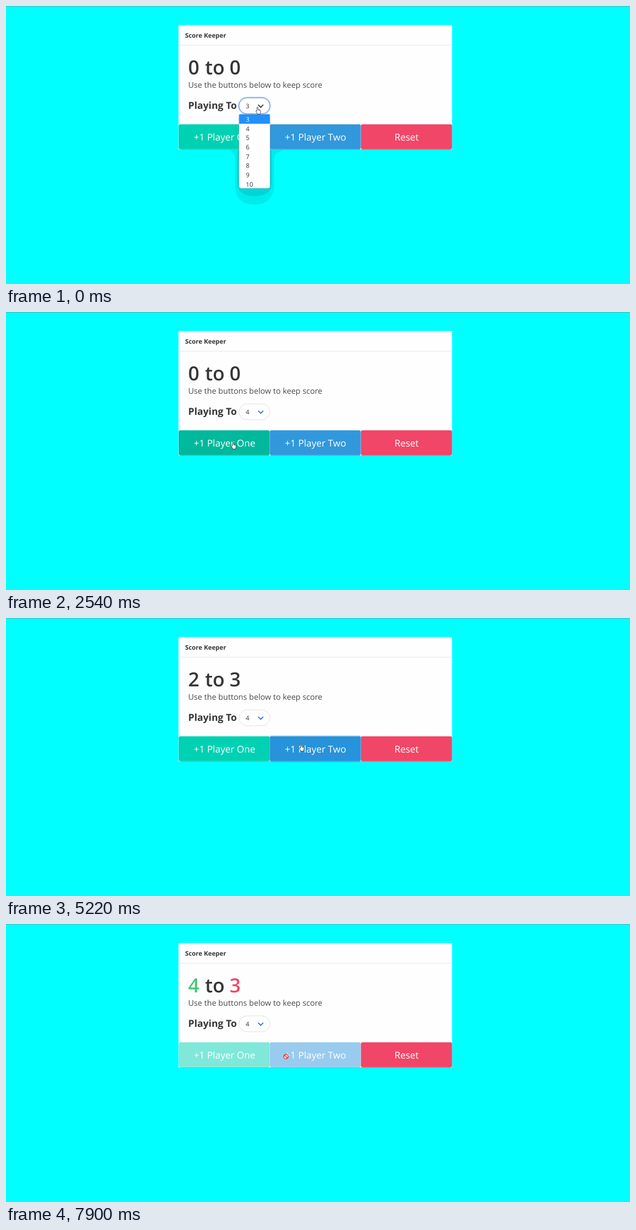
Animation, 1120 px wide and 500 px high, one loop 8 s. Source, as an HTML page:

```html
<!DOCTYPE html>
<html lang="en">
<head>
<meta charset="utf-8">
<title>Score Keeper</title>
<style>
html, body { margin: 0; width: 100%; height: 100%; overflow: hidden; background: #0ff; }
svg { display: block; }
text { font-family: "Open Sans", "Noto Sans", sans-serif; fill: #363636; text-rendering: geometricPrecision; }
.bold { font-weight: 700; }
.score text { font-size: 35px; font-weight: 600; }
.label text { font-size: 17px; fill: #fff; text-anchor: middle; }
.small { font-size: 11.3px; }
.ring { fill: none; stroke-width: 1.8; stroke-opacity: .35; }

/* Every change is a hard cut on one shared 8 s clock. */
.a { animation: 8s step-end infinite; }

.menu { animation-name: menu; }
@keyframes menu { 0% { visibility: visible } 17.625%, 100% { visibility: hidden } }
.picked { animation-name: picked; }
@keyframes picked { 0% { visibility: hidden } 17.625%, 100% { visibility: visible } }
.bar { animation-name: bar; }
@keyframes bar { 0% { transform: none } 6.375%, 100% { transform: translateY(16.7px) } }
.opt3 { animation-name: opt3; }
@keyframes opt3 { 0% { fill: #fff } 6.375%, 100% { fill: #363636 } }
.opt4 { animation-name: opt4; }
@keyframes opt4 { 0% { fill: #363636 } 6.375%, 100% { fill: #fff } }
.chevron { animation-name: chevron; }
@keyframes chevron { 0% { stroke: #363636 } 17.625%, 100% { stroke: #3273dc } }
.pill { animation-name: pill; }
@keyframes pill { 0% { stroke: #3f7be0 } 31.75%, 100% { stroke: #dbdbdb } }
.halo { animation-name: halo; }
@keyframes halo { 0% { visibility: visible } 31.75%, 100% { visibility: hidden } }

.left { animation-name: left; }
@keyframes left {
  0% { transform: none }
  33.375% { transform: translateY(-50px) }
  38.125% { transform: translateY(-100px) }
  78.375% { transform: translateY(-150px) }
  86.375%, 100% { transform: translateY(-200px) }
}
.right { animation-name: right; }
@keyframes right {
  0% { transform: none }
  47.75% { transform: translateY(-50px) }
  58.75% { transform: translateY(-100px) }
  65.25%, 100% { transform: translateY(-150px) }
}
.lost { animation-name: lost; }
@keyframes lost { 0% { fill: #363636 } 86.375%, 100% { fill: #f14668 } }

.one { animation-name: one; }
@keyframes one {
  0% { fill: #00d1b2 }
  17.625% { fill: #00c4a7 }
  31.75% { fill: #00b89c }
  33.375% { fill: #00c4a7 }
  36.5% { fill: #00b89c }
  38.125% { fill: #00c4a7 }
  41.25% { fill: #00d1b2 }
  68.75% { fill: #00c4a7 }
  75.125% { fill: #00b89c }
  78.375% { fill: #00c4a7 }
  81.625% { fill: #00b89c }
  86.375%, 100% { fill: #7fe8d8 }
}
.two { animation-name: two; }
@keyframes two {
  0% { fill: #3298dc }
  41.25% { fill: #2793da }
  46.125% { fill: #238cd1 }
  47.75% { fill: #2793da }
  57.125% { fill: #238cd1 }
  58.75% { fill: #2793da }
  68.75% { fill: #3298dc }
  86.375%, 100% { fill: #98cbed }
}
.ring1 { animation-name: ring1; }
@keyframes ring1 {
  0%, 36.5%, 46.125%, 81.625%, 100% { visibility: hidden }
  33.375%, 38.125%, 78.375% { visibility: visible }
}
.ring2 { animation-name: ring2; }
@keyframes ring2 {
  0%, 57.125%, 75.125%, 100% { visibility: hidden }
  47.75%, 58.75% { visibility: visible }
}

.hand { animation-name: hand, handShown; }
@keyframes hand {
  0% { transform: translate(448px, 181px) }
  3.125% { transform: translate(447px, 191px) }
  4.75% { transform: translate(445px, 202px) }
  6.375% { transform: translate(443px, 213px) }
  8% { transform: translate(441px, 222px) }
  17.625% { transform: translate(438px, 224px) }
  20.75% { transform: translate(418px, 229px) }
  22.25% { transform: translate(404px, 233px) }
  41.25% { transform: translate(526px, 226px) }
  66.875% { transform: translate(516px, 229px) }
  68.75% { transform: translate(460px, 237px) }
  70.25%, 100% { transform: translate(443px, 241px) }
}
@keyframes handShown { 0% { visibility: visible } 86.375%, 100% { visibility: hidden } }
.stop { animation-name: stop, stopShown; }
@keyframes stop {
  0% { transform: translate(446.5px, 245px) }
  94.25% { transform: translate(456px, 244px) }
  95.75% { transform: translate(474px, 242px) }
  97.25% { transform: translate(491px, 240px) }
  98.75%, 100% { transform: translate(502.5px, 238.5px) }
}
@keyframes stopShown { 0% { visibility: hidden } 86.375%, 100% { visibility: visible } }
</style>
</head>
<body>
<svg width="100%" height="100%" viewBox="0 0 1120 500">
  <rect width="1120" height="500" fill="#0ff"/>
  <rect width="1120" height="1" fill="#48b4b4"/>

  <g class="a menu">
    <path d="M397 258Q411 260 411 276V322C411 346 424 357 446 357S481 346 481 322V276Q481 260 509 258Z" fill="#00ecec"/>
    <path d="M415 258V318Q416 342 446 342T477 318V258Z" fill="#00d6d6"/>
  </g>
  <path d="M314 258.5H797" stroke="#00dcde"/>

  <rect x="309.6" y="34.2" width="491" height="223.7" rx="1.5" fill="#fefefe"/>
  <path d="M310 70.5H800.5" stroke="#e6e6e6"/>
  <text class="bold" x="321.5" y="57" font-size="11.35">Score Keeper</text>

  <g class="score">
    <svg x="320" y="90" width="34" height="40" overflow="hidden">
      <g class="a left">
        <text x="7" y="33">0</text>
        <text x="7" y="83">1</text>
        <text x="7" y="133">2</text>
        <text x="7" y="183">3</text>
        <text x="7" y="233" style="fill:#48c774">4</text>
      </g>
    </svg>
    <text x="357.3" y="123">to</text>
    <svg x="395" y="90" width="34" height="40" overflow="hidden">
      <g class="a right">
        <text x="6.2" y="33">0</text>
        <text x="6.2" y="83">1</text>
        <text x="6.2" y="133">2</text>
        <text class="a lost" x="6.2" y="183">3</text>
      </g>
    </svg>
  </g>
  <text x="327" y="147" font-size="14.2" style="fill:#4a4a4a">Use the buttons below to keep score</text>
  <text class="bold" x="327" y="185" font-size="17.4">Playing To</text>

  <rect class="a halo" x="417.2" y="164.2" width="57.4" height="30.6" rx="15.3" fill="none" stroke="#3273dc" stroke-opacity=".3" stroke-width="1.8"/>
  <rect class="a pill" x="418.2" y="165.2" width="55.4" height="28.6" rx="14.3" fill="#fff" stroke-width=".9"/>
  <text class="a small menu" x="430.3" y="184">3</text>
  <text class="a small picked" x="430.3" y="184">4</text>
  <path class="a chevron" d="M452.6 177.6L457.2 182.2L461.8 177.6" fill="none" stroke-width="1.8"/>

  <rect class="a one" x="310" y="212.7" width="163.4" height="45.1" rx="3"/>
  <rect class="a two" x="473.6" y="212.7" width="163.1" height="45.1" rx="3"/>
  <rect x="637.1" y="212.7" width="163.5" height="45.1" rx="3" fill="#f14668"/>
  <rect class="a ring ring1" x="309.2" y="211.8" width="165.1" height="46.9" rx="4" stroke="#00d1b2"/>
  <rect class="a ring ring2" x="472.7" y="211.8" width="164.9" height="46.9" rx="4" stroke="#3298dc"/>
  <g class="label">
    <text x="392.3" y="242">+1 Player One</text>
    <text x="555.5" y="242">+1 Player Two</text>
    <text x="719" y="242">Reset</text>
  </g>

  <g class="a menu">
    <rect x="418" y="194.5" width="56" height="133.5" rx="4" fill="#fff" stroke="#667" stroke-opacity=".5" stroke-width=".8"/>
    <rect class="a bar" x="418.4" y="195" width="55.2" height="16.8" fill="#1e90ff"/>
    <g class="small">
      <text class="a opt3" x="430.5" y="208">3</text>
      <text class="a opt4" x="430.5" y="224.7">4</text>
      <text x="430.5" y="241.4">5</text>
      <text x="430.5" y="258.1">6</text>
      <text x="430.5" y="274.8">7</text>
      <text x="430.5" y="291.4">8</text>
      <text x="430.5" y="308.1">9</text>
      <text x="430.5" y="324.8">10</text>
    </g>
  </g>

  <path class="a hand" d="M2.5 8V1.6a1 1 0 0 1 2 0V5.2l3.4.8a1.2 1.2 0 0 1 1 1.2v2.6l-1 3.7H3.6L.8 9.2C0 7.8 1.2 7 2.5 8zM6.2 5.8v2" fill="#fff" stroke="#222" stroke-width=".8"/>
  <g class="a stop">
    <circle r="4.9" fill="#fff"/>
    <circle r="4" fill="#fff" stroke="#d0121b" stroke-width="1.5"/>
    <path d="M-2.8 -2.8L2.8 2.8" stroke="#d0121b" stroke-width="1.5"/>
  </g>
</svg>
</body>
</html>
```
